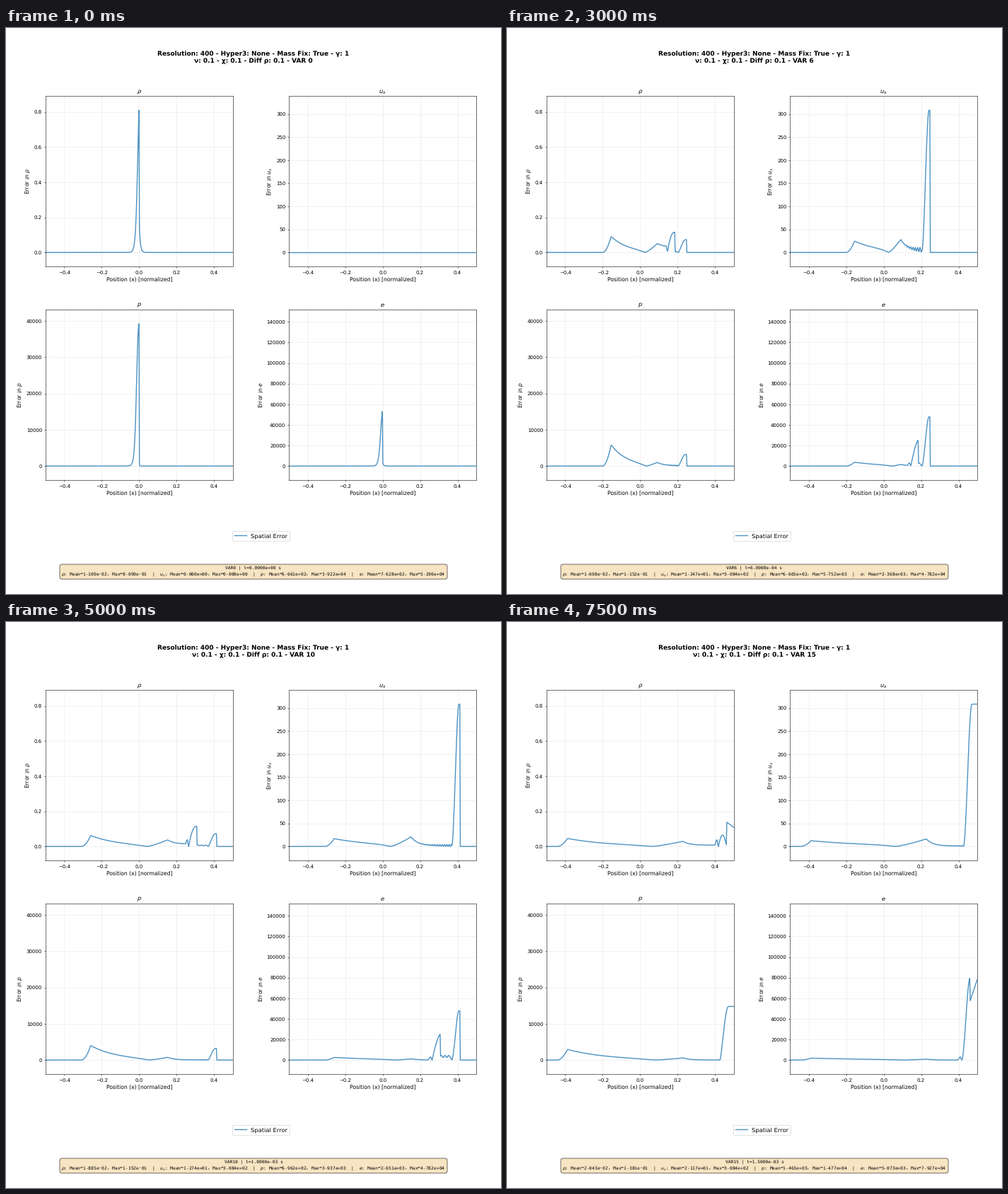
Animation, 700 px wide and 800 px high, one loop 8 s. Source, as a matplotlib script:

```python
import numpy as np
import matplotlib.pyplot as plt
from matplotlib.animation import FuncAnimation
from matplotlib.patches import FancyBboxPatch

plt.rcParams["text.hinting"] = "none"

STEPS = 16
x = np.linspace(-0.5, 0.5, 400)

# Heights are given at step 4; the rules below scale them over time.
MODELS = {
    r"\rho": dict(top=0.8099, start=0.8099, jump=3.32, head=0.1215, fan=2.05,
                  zero=0.0042, hump=0.0645, rest=0.06, ripple=0.0055,
                  shock=0.073, sharp=1.3, wall=0.1384, growth=1 / 3,
                  contact=0.1152, bend=2.4, lump=0.038, rear=0.006,
                  arch=0.47, after=(1, 0.78)),
    "u_x": dict(top=308.4, start=0, jump=0, head=33, fan=1.4,
                zero=0.0042, hump=36, rest=9, ripple=10,
                shock=308.4, sharp=1.9, wall=308.4, growth=1),
    "p": dict(top=39220, start=39220, jump=9.2, head=7796, fan=2.25,
              zero=0.0052, hump=1280, rest=200, ripple=260,
              shock=3200, sharp=1.3, wall=14770, growth=0.444),
    "e": dict(top=138100, start=52900, jump=5.3, head=4950, fan=1.4,
              zero=0.007, hump=2000, rest=300, ripple=300,
              shock=47820, sharp=1.9, wall=79680, growth=0.663,
              contact=25000, bend=1.5, lump=3000, rear=3500,
              arch=0, after=(0.72, 0.98)),
}


def part(a, b):
    return np.clip((x - a) / (b - a), 0, 1)


def ramp(a, b, height, power):
    return height * np.sin(np.pi / 2 * part(a, b)) ** power


def speeds(s):
    """Contact position, the dip trailing it, and the shock front."""
    contact = 0.0308 * s
    return contact, contact - 0.045 * (1 - np.exp(-s / 2.9)), 0.0413 * s


def initial(m):
    """Error of a smoothed jump, interpolated in log space."""
    if not m["jump"]:
        return np.zeros_like(x)
    smooth = np.exp(-m["jump"] / (1 + np.exp(-160 * x)))
    err = np.abs(smooth - np.where(x < 0, 1, np.exp(-m["jump"])))
    return m["start"] * err / err.max()


def waves(m, s):
    """Fan, hump, contact and shock, each moving at its own speed."""
    head, zero, hump = -0.0259 * s, m["zero"] * s, 0.0152 * s
    contact, dip, front = speeds(s)
    foot = front - min(0.044, 0.028 * s)

    peak = m["head"] * (4.6 / (s + 0.6)) ** 0.8
    rise = part(head - 0.0415 * (s / 4) ** 0.2, head) ** 1.9
    xi = part(head, zero)
    y = peak * rise * np.exp(-m["fan"] * xi) * (1 - xi ** 7)

    g = m["hump"] * (4 / s) ** 0.6
    rest = min(m["rest"] * (4 / s) ** 1.6, 0.9 * g)
    ripple = m["ripple"] * min((4 / s) ** 1.5, 1.5)
    d = np.clip(x - hump, 0, None)
    tail = rest + (g - rest) * np.exp(-d / 0.034)
    tail = np.abs(tail + ripple * part(hump, foot) * np.sin(2 * np.pi * d / 0.0125))
    y = np.where(x < hump, y + g * part(zero, hump) ** 1.3, tail)

    if "contact" in m:
        lump = max(m["lump"], 1.2 * rest) * np.exp(-((x - dip + 0.0085) / 0.008) ** 2)
        y = np.where(x >= hump, np.maximum(y, lump) * part(dip, dip - 0.006), y)
        rear = m["rear"] * np.clip((s - 3) / 5, 0, 1)
        flat = rear * (1 + 0.3 * np.sin(2 * np.pi * (x - contact) / 0.02))
        y = np.where(x >= dip, m["contact"] * (1 - (1 - part(dip, contact)) ** m["bend"]), y)
        y = np.where(x >= contact, flat * part(foot, foot - 0.006), y)
        foot = max(foot, contact - 1e-9) if s < 4 else foot
        begin = max(contact, foot)
    else:
        y = y * np.where(x > hump, part(foot + 0.004, foot - 0.002), 1)
        begin = max(hump, foot)

    rise_from = front - min(0.044, 0.028 * s)
    shock = ramp(rise_from, front - min(0.005, 0.00125 * s), m["shock"], m["sharp"])
    y = np.where(x >= begin, np.maximum(y, shock), y)
    return np.where(x < front, y, 0)


def reflect(m, s, y):
    """Wave returning from the right wall, crossing the contact last."""
    contact, dip, _ = speeds(s)
    foot = 0.5 - 0.0184 * (s - 11)
    height = m["wall"] * min(1, m["growth"] * (s - 12))
    back = ramp(foot, min(0.5, foot + 0.045), height, m["sharp"])
    if "contact" in m and contact > foot:
        foot = dip
        if m["arch"]:
            near = m["arch"] * height * np.sin(np.pi * part(dip, contact))
        else:
            near = ramp(dip, contact, height, m["sharp"])
        a, b = m["after"]
        far = height * (a + (b - a) * part(contact, 0.5))
        back = np.where(x < contact, near, far)
    return np.where(x >= foot, back, y)


def error(key, s):
    m = MODELS[key]
    if s == 0:
        return initial(m)
    y = waves(m, s)
    return reflect(m, s, y) if s > 12 else y


def heading(s):
    return ("Resolution: 400 - Hyper3: None - Mass Fix: True - γ: 1\n"
            f"ν: 0.1 - χ: 0.1 - Diff ρ: 0.1 - VAR {s}")


def clock(s):
    return f"VAR{s} | t={s * 1e-4:.4e} s"


def summary(curves):
    return "  |  ".join(f"${key}$: Mean={y.mean():.3e}, Max={y.max():.3e}"
                        for key, y in curves.items())


def note(y):
    return fig.text(0.5, y, "", ha="center", va="baseline", fontsize=9,
                    family="monospace")


fig = plt.figure(figsize=(14, 16), dpi=50)
grid = fig.add_gridspec(3, 2, height_ratios=[1, 1, 0.15], left=0.08, right=0.95,
                        top=0.88, bottom=0.08, hspace=0.35, wspace=0.3)
title = fig.suptitle("", fontsize=13, fontweight="bold", y=0.96, linespacing=1.24)

lines = {}
for i, (key, m) in enumerate(MODELS.items()):
    ax = fig.add_subplot(grid[i // 2, i % 2])
    lines[key], = ax.plot(x, error(key, 0), color="tab:blue", lw=2, alpha=0.8,
                          label="Spatial Error")
    ax.set_xlim(-0.5, 0.5)
    ax.set_ylim(-0.1 * m["top"], 1.1 * m["top"])
    ax.set_title(f"${key}$", fontsize=12)
    ax.set_xlabel("Position (x) [normalized]", fontsize=11)
    ax.set_ylabel(f"Error in ${key}$", fontsize=11)
    ax.grid(True, alpha=0.3)
    ax.spines["bottom"].set_snap(False)

key_ax = fig.add_subplot(grid[2, :])
key_ax.axis("off")
key_ax.legend(handles=[lines["p"]], loc="center", fontsize=12)

fig.add_artist(FancyBboxPatch((1.52, 0.42), 10.96, 0.42, facecolor="wheat",
                              edgecolor="black", alpha=0.8, lw=1,
                              boxstyle="round,pad=0,rounding_size=0.062",
                              transform=fig.dpi_scale_trans))
time_note, stat_note = note(0.0434), note(0.0325)


def update(s):
    curves = {key: error(key, s) for key in MODELS}
    for key, line in lines.items():
        line.set_ydata(curves[key])
    title.set_text(heading(s))
    time_note.set_text(clock(s))
    stat_note.set_text(summary(curves))
    return [*lines.values(), title, time_note, stat_note]


update(0)
anim = FuncAnimation(fig, update, frames=STEPS, interval=500, repeat=True,
                     repeat_delay=0, blit=False)
plt.show()
```
